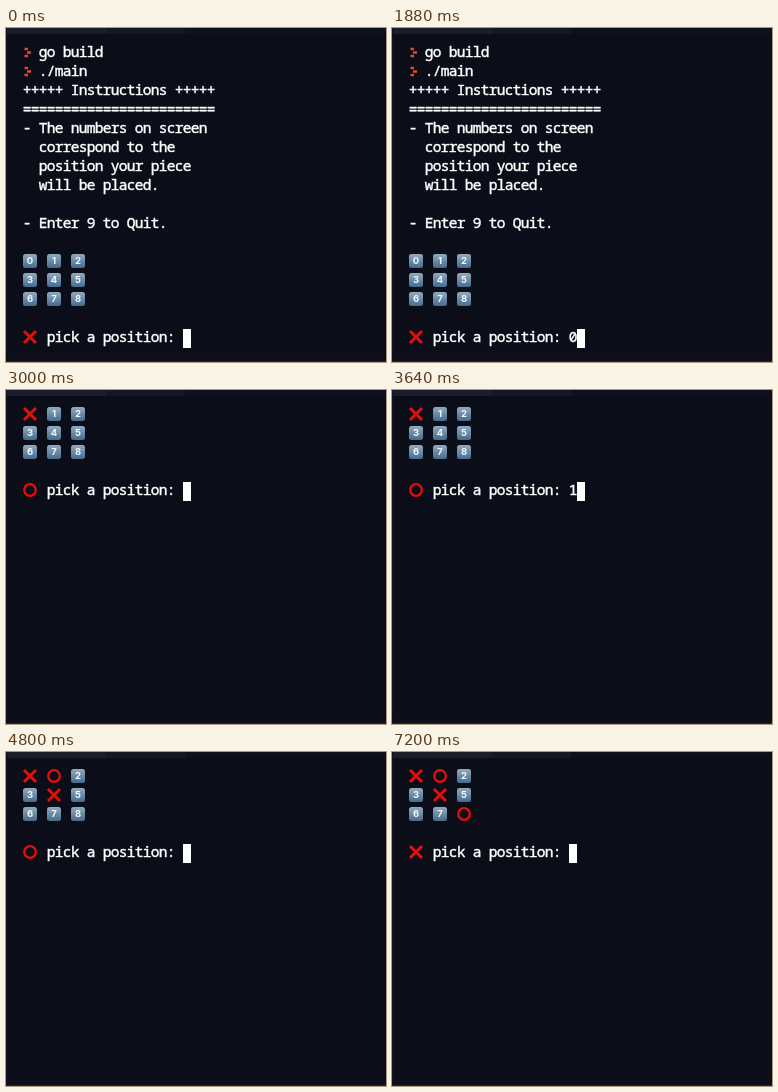
Animation of 380x334 px, one loop 8 s. Source, as an HTML page:

```html
<!DOCTYPE html>
<html lang="en">
<head>
<meta charset="utf-8">
<title>Terminal tic-tac-toe</title>
<style>
  html, body { margin: 0; width: 100%; height: 100%; overflow: hidden; background: #0b0d18; }
  svg { display: block; width: 380px; height: 334px; }
  text { white-space: pre; }
  .line {
    font: 500 14.5px "Noto Sans Mono", "DejaVu Sans Mono", monospace; letter-spacing: -0.7px;
    fill: #fff; stroke: #fff; stroke-width: 0.45px;
  }
  .digit { font: 700 9.5px Inter, Roboto, sans-serif; text-anchor: middle; fill: #f4f8fb; }
</style>
</head>
<body>
<svg viewBox="0 0 380 334">
  <defs>
    <linearGradient id="key" x1="0" y1="0" x2="0" y2="1">
      <stop offset="0" stop-color="#8fabc1"/>
      <stop offset="1" stop-color="#476b8d"/>
    </linearGradient>
  </defs>
  <rect width="380" height="334" fill="#0b0d18"/>
  <rect width="380" height="6" fill="#0c111d"/>
  <rect width="100" height="6" fill="#1a1d2a"/>
  <rect x="100" width="79" height="6" fill="#141824"/>
  <rect width="1" height="334" fill="#13111d"/>
  <rect y="327" width="380" height="6" fill="#0e0d1a"/>
  <rect y="333" width="380" height="1" fill="#252736"/>
  <g id="screen"></g>
</svg>
<script>
const LOOP = 8000, LEFT = 17, TOP = 16, COL = 8, ROW = 19;
const screen = document.getElementById('screen');

// Each turn: when its screen appears, when the digit is typed, board and player.
const turns = [
  { start: 0,    typed: 1520,     digit: '0', board: '012345678', player: 'X', intro: true },
  { start: 1960, typed: 3200,     digit: '1', board: 'X12345678', player: 'O' },
  { start: 3680, typed: 4480,     digit: '4', board: 'XO2345678', player: 'X' },
  { start: 4800, typed: 6400,     digit: '8', board: 'XO23X5678', player: 'O' },
  { start: 6600, typed: Infinity, digit: '',  board: 'XO23X567O', player: 'X' }
];

const instructions = [
  '  go build',
  '  ./main',
  '+++++ Instructions +++++',
  '='.repeat(24),
  '- The numbers on screen',
  '  correspond to the',
  '  position your piece',
  '  will be placed.',
  '',
  '- Enter 9 to Quit.'
];

const colX = col => LEFT + col * COL;
const rowY = row => TOP + row * ROW;

const line = (str, col, row) =>
  `<text class="line" xml:space="preserve" x="${colX(col) - 0.3}" y="${rowY(row) + 13}">${str}</text>`;

const chevron = row =>
  `<path d="M18.5 ${rowY(row) + 5}h3.5m-1 3.5h4m-6.5 3.5h3.5" stroke="#e2482b" stroke-width="2.6"/>`;

function symbol(mark, col, row) {
  const x = colX(col) + 7, y = rowY(row) + 8;
  const shapes = {
    X: '<path d="M-6-6L6 6M6-6L-6 6" stroke="#e30f0c" stroke-width="3"/>',
    O: '<circle r="5.8" fill="none" stroke="#ea0d0a" stroke-width="2.2"/>'
  };
  const keycap = `<rect x="-7" y="-7" width="14" height="14" rx="2.5" fill="url(#key)"/>
    <text class="digit" y="3.4">${mark}</text>`;
  return `<g transform="translate(${x} ${y})">${shapes[mark] || keycap}</g>`;
}

function screenMarkup(turn, typed) {
  const boardRow = turn.intro ? 11 : 0;
  const promptRow = boardRow + 4;
  const prompt = 'pick a position: ' + (typed ? turn.digit : '');
  const intro = turn.intro
    ? instructions.map((str, row) => line(str, 0, row)).join('') + chevron(0) + chevron(1)
    : '';
  const board = [...turn.board]
    .map((mark, i) => symbol(mark, i % 3 * 3, boardRow + Math.floor(i / 3))).join('');
  const cursor =
    `<rect x="${colX(3 + prompt.length)}" y="${rowY(promptRow)}" width="8" height="19" fill="#fff"/>`;
  return intro + board + symbol(turn.player, 0, promptRow) + line(prompt, 3, promptRow) + cursor;
}

let shown = '';
function render(time) {
  const turn = turns.filter(item => item.start <= time).pop();
  const typed = time >= turn.typed;
  const state = turn.start + ':' + typed;
  if (state === shown) return;
  shown = state;
  screen.innerHTML = screenMarkup(turn, typed);
}

const origin = performance.now();
function tick() {
  render((performance.now() - origin) % LOOP);
  requestAnimationFrame(tick);
}
tick();
</script>
</body>
</html>
```
